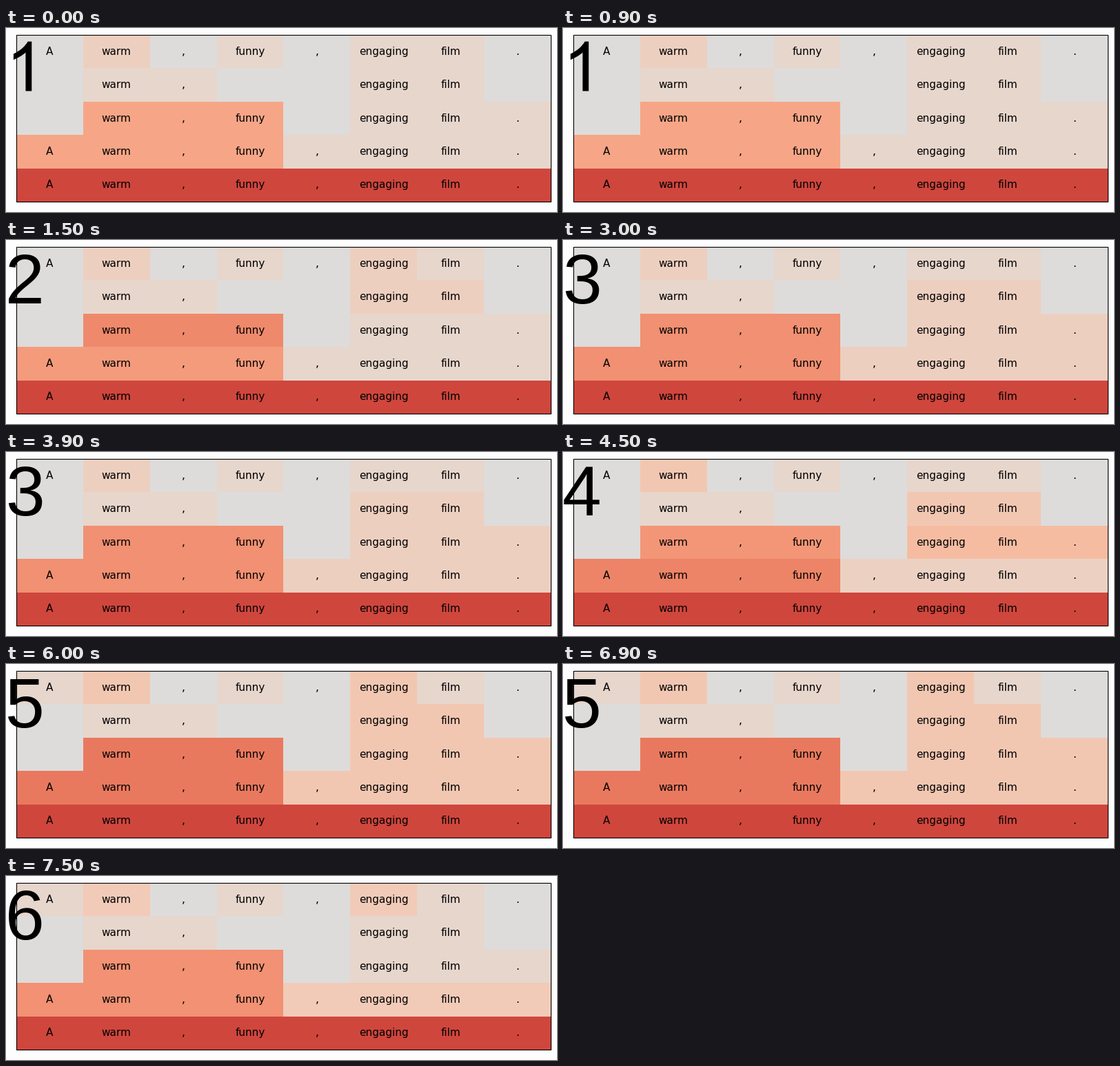
A matplotlib script for the animation above (8 s loop, 799 by 267 pixels).

```python
import numpy as np
import matplotlib.pyplot as plt
from matplotlib.animation import FuncAnimation
from matplotlib.patches import PathPatch, Rectangle
from matplotlib.path import Path

W, H, DPI = 799, 267, 64
PT = 72 / DPI  # points per pixel
TICK, TICKS_PER_STEP, TICKS = 500, 3, 16

LEFT, RIGHT, TOP, BOTTOM = 15.2, 790.2, 9.7, 251.6
ROWS, COLS = 5, 8
CELL_W, CELL_H = (RIGHT - LEFT) / COLS, (BOTTOM - TOP) / ROWS
NUDGE_X, NUDGE_Y = -0.3, 0.55  # label offset from the cell centre

WORDS = ["A", "warm", ",", "funny", ",", "engaging", "film", "."]
SHOWN = [range(8), (1, 2, 5, 6), (1, 2, 3, 5, 6, 7), range(8), range(8)]

NEUTRAL, FAINT, SENTENCE = 0.5, 0.543, 0.92


def mild(step):
    return np.interp(step, [2, 3, 4, 5], [0.578, 0.61, 0.61, 0.595])


def strong(step):
    return np.interp(step, [0, 4, 5], [0.717, 0.824, 0.766])


def sway(step):
    """Swing between neighbouring phrases that settles at step 4."""
    return 0.042 * np.sin(np.pi * min(step, 4) / 2)


def score_grid(step):
    grid = np.full((ROWS, COLS), NEUTRAL)

    def fill(row, start, end, score, active=True):
        grid[row, start:end] = score if active else FAINT

    if step >= 4:
        fill(0, 0, 1, FAINT)
    fill(0, 1, 2, mild(step))
    fill(0, 3, 4, FAINT)
    fill(0, 5, 6, mild(step), step in (1, 4, 5))
    fill(0, 6, 7, FAINT)
    fill(1, 1, 3, FAINT)
    fill(1, 5, 7, mild(step), 1 <= step <= 4)
    fill(2, 1, 4, strong(step) + sway(step))
    fill(2, 5, 8, mild(step) - sway(step), 2 <= step <= 4)
    fill(3, 0, 4, strong(step))
    fill(3, 4, 8, mild(step) + sway(step), step >= 2)
    fill(4, 0, 8, SENTENCE)
    return grid


def footless_one(baseline, size):
    """A plain numeral one without a foot, in font units of 2048 per em."""
    pts = [(763, 0), (583, 0), (583, 1147),
           (518, 1085), (412.5, 1023), (307, 961), (223, 930),
           (223, 1104),
           (374, 1175), (487, 1276), (600, 1377), (647, 1472),
           (763, 1472), (763, 0)]
    line, curve = [Path.LINETO], [Path.CURVE3] * 4
    codes = [Path.MOVETO] + line * 2 + curve + line + curve + line + [Path.CLOSEPOLY]
    xy = np.array(pts) * size / 2048
    return Path(np.column_stack([xy[:, 0], baseline - xy[:, 1]]), codes)


fig = plt.figure(figsize=(W / DPI, H / DPI), dpi=DPI, facecolor="#fdfdfd")
ax = fig.add_axes([0, 0, 1, 1])
ax.axis("off")

heat = ax.imshow(score_grid(0), cmap="coolwarm", vmin=0, vmax=1, aspect="auto",
                 interpolation="nearest", extent=(LEFT, RIGHT, BOTTOM, TOP))
ax.set_xlim(0, W)
ax.set_ylim(H, 0)
ax.add_patch(Rectangle((LEFT, TOP), RIGHT - LEFT, BOTTOM - TOP, fill=False,
                       edgecolor="black", linewidth=1.11 * PT))

for row, cols in enumerate(SHOWN):
    for col in cols:
        ax.text(LEFT + (col + 0.5) * CELL_W + NUDGE_X,
                TOP + (row + 0.5) * CELL_H + NUDGE_Y, WORDS[col],
                family="DejaVu Sans", fontsize=15.28 * PT, ha="center", va="center")

one = ax.add_patch(PathPatch(footless_one(91.5, 100), facecolor="black",
                             linewidth=0, zorder=5))
digit = ax.text(-1, 92, "", family="Liberation Sans", fontsize=102 * PT,
                ha="left", va="baseline", zorder=5)


def update(tick):
    step = tick // TICKS_PER_STEP
    heat.set_data(score_grid(step))
    one.set_visible(step == 0)
    digit.set_text(str(step + 1) if step else "")
    return heat, one, digit


anim = FuncAnimation(fig, update, frames=TICKS, interval=TICK,
                     init_func=lambda: update(0), repeat=True, repeat_delay=0)
plt.show()
```
